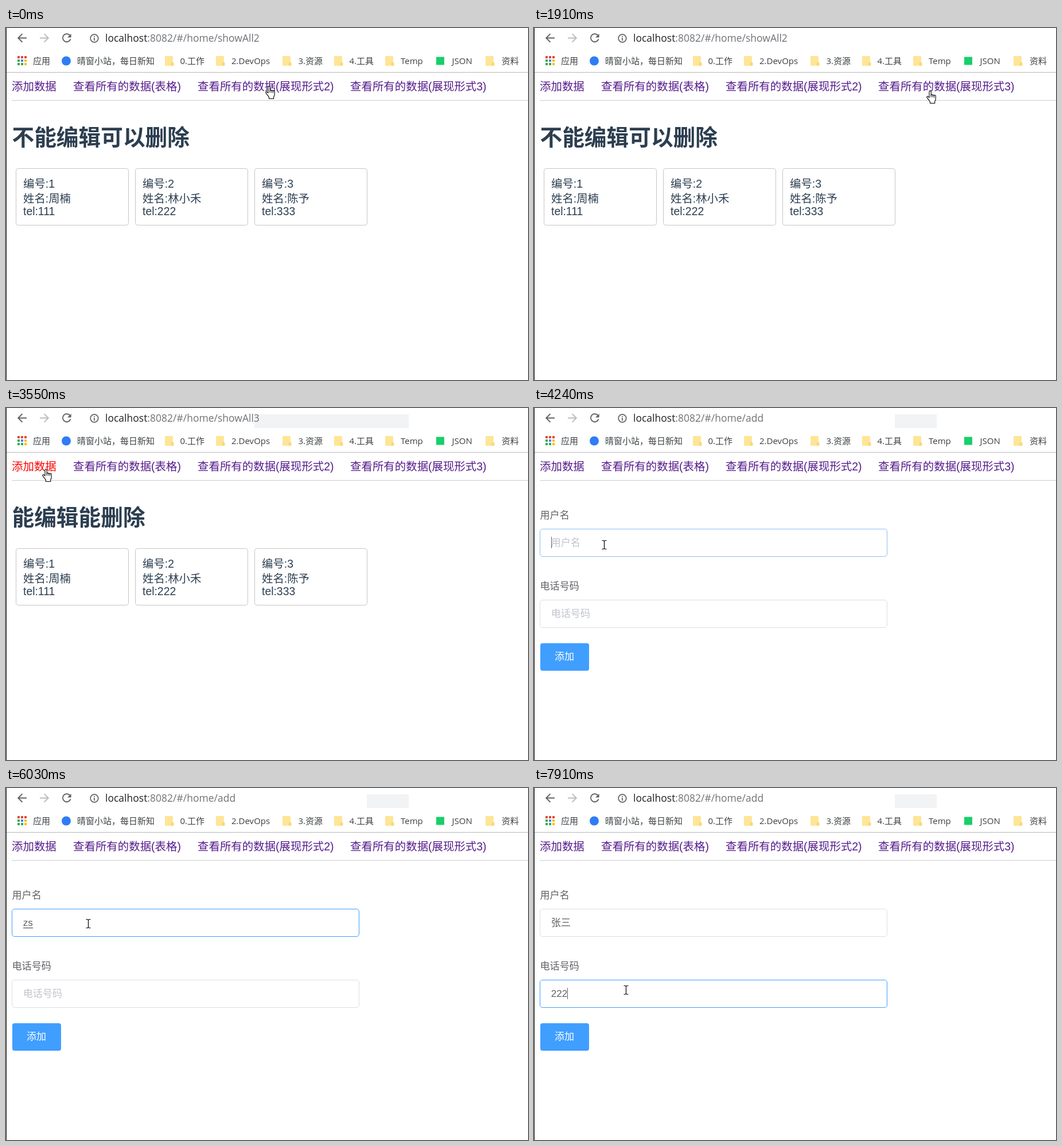
Animation, 910 px wide and 615 px high, one loop 8 s. Source, as an HTML page:

```html
<!DOCTYPE html>
<html lang="zh-CN">
<head>
<meta charset="utf-8">
<title>数据管理</title>
<style>
  html, body { margin: 0; width: 100%; height: 100%; overflow: hidden; background: #fff; }
  svg { display: block; width: 910px; height: 615px; }
  text { white-space: pre; }
  .bar { font-family: "Open Sans", "Noto Sans CJK SC", sans-serif; }
  .page { font-family: "Liberation Sans", "Noto Sans CJK SC", sans-serif; font-weight: 350; }
  .url { font-size: 17.5px; }
  .mark { font-size: 15px; fill: #3c4043; }
  .link { font-size: 19.45px; fill: #551a8b; }
  .head { font-size: 38.7px; font-weight: 700; fill: #2c3e50; }
  .card { font-size: 19.4px; fill: #2c3e50; }
  .form { font-size: 17.1px; fill: #606266; }
  .hint { fill: #c0c4cc; }
</style>
</head>
<body>
<svg id="stage" viewBox="0 0 910 615"></svg>
<script>
const LOOP = 8000;
const stage = document.getElementById('stage');

function add(parent, tag, attrs, content) {
  const el = document.createElementNS('http://www.w3.org/2000/svg', tag);
  for (const key in attrs) el.setAttribute(key, attrs[key]);
  if (content) el.textContent = content;
  parent.append(el);
  return el;
}
const text = (parent, cls, x, y, content) => add(parent, 'text', { class: cls, x, y }, content);
const rect = (parent, x, y, width, height, fill, more) =>
  add(parent, 'rect', { x, y, width, height, fill, ...more });
const path = (parent, d, stroke, width, fill = 'none') =>
  add(parent, 'path', { d, stroke, 'stroke-width': width, fill });
const show = (el, on) => { el.style.display = on ? '' : 'none'; };

// Browser toolbar
const bar = add(stage, 'g', { class: 'bar' });
const patch = rect(bar, 433, 11, 269, 24, '#f1f3f4');
path(bar, 'M36 17.5H21.5M28.5 10.2L21.2 17.5L28.5 24.8', '#5f6368', 1.9);
path(bar, 'M59 17.5H73.5M66.5 10.2L73.8 17.5L66.5 24.8', '#babcbe', 1.9);
path(bar, 'M111.2 12.6A7 7 0 1 0 112.6 19.3', '#5f6368', 1.9);
path(bar, 'M113.6 10V16.6H107Z', 'none', 0, '#5f6368');
add(bar, 'circle', { cx: 154, cy: 18, r: 6.8, fill: 'none', stroke: '#5f6368', 'stroke-width': 1.7 });
path(bar, 'M154 17V22M154 14V15.8', '#5f6368', 1.8);
const url = text(bar, 'url', 173, 24);
add(url, 'tspan', { fill: '#202124' }, 'localhost');
const route = add(url, 'tspan', { fill: '#6f7377' });

// Bookmarks
const R = '#ea4335', G = '#34a853', B = '#4285f4', Y = '#fbbc05';
[R, R, R, G, B, Y, G, G, Y].forEach((color, i) =>
  rect(bar, 20 + i % 3 * 6, 49 + Math.floor(i / 3) * 6, 4, 4, color));
add(bar, 'circle', { cx: 105, cy: 57.5, r: 8, fill: '#2f7cf6' });
rect(bar, 750, 50.5, 14, 14, '#19cf6b');
for (const x of [277, 366, 482, 572, 661, 836]) {
  rect(bar, x, 49, 14, 17, '#ffe596', { rx: 1.2 });
  rect(bar, x + 10.5, 60, 5, 6, '#f9d978', { rx: 1 });
}
[[47, '应用'], [124, '晴窗小站，每日新知'], [303.5, '0.工作'], [393, '2.DevOps'], [509.5, '3.资源'],
 [598.5, '4.工具'], [688, 'Temp'], [777.5, 'JSON'], [864, '资料']]
  .forEach(([x, label]) => text(bar, 'mark', x, 63, label));
rect(bar, 0, 77, 910, 1, '#b6b6b6');

// Page navigation
const page = add(stage, 'g', { class: 'page' });
rect(page, 0, 0, 1, 615, '#1c1c1c');
const links = [[10, 78, '添加数据'], [117, 189, '查看所有的数据(表格)'],
  [334, 238, '查看所有的数据(展现形式2)'], [600, 238, '查看所有的数据(展现形式3)']];
const [addLink] = links.map(([x, , label]) => text(page, 'link', x, 109, label));
rect(page, 10, 126, 900, 1, '#cccccc');

// Card list
const list = add(page, 'g');
const heading = text(list, 'head', 10.5, 204.5);
['周楠', '林小禾', '陈予'].forEach((name, i) => {
  const x = 17 + i * 208, n = i + 1;
  rect(list, x - .5, 245.5, 196, 99, '#fff', { rx: 4, stroke: '#c6c6c6', transform: 'translate(1 0)' });
  text(list, 'card', x + 13, 279, '编号:' + n);
  text(list, 'card', x + 13, 304.5, '姓名:' + name);
  text(list, 'card', x + 13, 326.5, 'tel:' + n * 111);
});

// Form
const form = add(page, 'g');
function makeField(y, label) {
  text(form, 'form', 10.5, y - 18.5, label);
  const box = rect(form, 10.5, y + .5, 605, 48, '#fff', { rx: 4.5 });
  const hint = text(form, 'form hint', 29.7, y + 30, label);
  const value = text(form, 'form', 29.7, y + 30);
  const line = rect(form, 30, y + 33, 17, 1, '#303133');
  const caret = rect(form, 30, y + 14, 1, 20, '#606266');
  return { box, hint, value, line, caret };
}
const nameField = makeField(211, '用户名');
const telField = makeField(335, '电话号码');
rect(form, 11, 411, 85, 48, '#409eff', { rx: 4 });
text(form, 'form', 36, 440.3, '添加').style.fill = '#fff';

// Cursors, each with its hot spot at 0,0
const cursor = add(stage, 'g');
const hand = add(cursor, 'g', { transform: 'translate(-7 -1)', 'stroke-linejoin': 'round' });
path(hand, 'M5 12.5V2.4a1.6 1.6 0 0 1 3.2 0V8.2a1.5 1.5 0 0 1 2.8 .4a1.5 1.5 0 0 1 2.6 .6' +
  'a1.4 1.4 0 0 1 2.6 1.1V15c0 2-1.5 3.2-1.5 5v2.5H6.5v-2.5C5.5 18 2.8 15 1 12.4' +
  'c-.9-1.5 1-2.7 2.2-1.5Z', '#000', 1.1, '#fff');
path(hand, 'M8.2 8V12M11 9V12.2M13.6 9.6V12.6', '#000', 1);
const beam = path(cursor, 'M-3.5 -7.5H-1L.5 -6.5L2 -7.5H4.5M.5 -7V7M-3.5 7.5H-1L.5 6.5L2 7.5H4.5', '#000', 1.2);
const arrow = path(cursor, 'M0 0V16.5L3.8 13L6.4 19L8.9 17.9L6.3 12H11.5Z', '#000', 1, '#fff');

// Time, x, y of the hot spot
const track = [
  [0, 459, 102], [125, 440, 112], [375, 255, 148], [500, 310, 140], [875, 812, 95],
  [1125, 672, 108], [1500, 684, 107], [1870, 691, 110], [2000, 691, 110], [2125, 686, 108],
  [2250, 684, 108], [2500, 590, 130], [2750, 380, 145], [3000, 170, 138], [3250, 70, 107],
  [3750, 70, 107], [3875, 85, 160], [4120, 122, 239], [4625, 122, 239], [5120, 123, 228],
  [5375, 123, 228], [5625, 148, 240], [5990, 143, 237], [6250, 143, 237], [6600, 165, 352],
  [7000, 165, 352], [7375, 160, 353], [LOOP, 160, 353]
];
const nameSteps = [[0, ''], [5610, 'z'], [5760, 'zs'], [6300, '张三']];
const telSteps = [[0, ''], [7500, '2'], [7660, '22'], [7910, '222']];
const routeSteps = [[0, 'showAll2'], [2050, 'showAll3'], [3670, 'add']];
const blinkSteps = [0, 4100, 6300, 6720, 7500, 7660, 7910].map(t => [t, t]);

const at = (steps, t) => steps.findLast(step => step[0] <= t)[1];
const ramp = (t, start, length) => Math.min(1, Math.max(0, (t - start) / length));

function position(t) {
  const i = track.findIndex(p => p[0] > t);
  const [t0, x0, y0] = track[i - 1], [t1, x1, y1] = track[i];
  const k = (t - t0) / (t1 - t0);
  return [x0 + (x1 - x0) * k, y0 + (y1 - y0) * k];
}

function drawField(field, value, focus, caretOn, composing) {
  const idle = [220, 223, 230], active = [64, 158, 255];
  const mixed = idle.map((c, i) => Math.round(c + (active[i] - c) * focus));
  field.box.setAttribute('stroke', `rgb(${mixed})`);
  field.value.textContent = value;
  show(field.hint, !value);
  show(field.line, composing);
  show(field.caret, caretOn && !composing);
  const width = value ? field.value.getComputedTextLength() : 0;
  field.line.setAttribute('width', width);
  field.caret.setAttribute('x', Math.round(29.7 + width));
}

function drawCursor(t, onForm) {
  const [x, y] = position(Math.floor(t / 125) * 125);
  const overLink = y > 90 && y < 114 && links.some(([left, w]) => x >= left && x <= left + w);
  const overField = onForm && x > 10 && x < 616 && (y > 211 && y < 260 || y > 335 && y < 384);
  cursor.setAttribute('transform', `translate(${Math.round(x)} ${Math.round(y)})`);
  show(hand, overLink);
  show(beam, overField);
  show(arrow, !overLink && !overField);
}

function draw(t) {
  const onForm = t >= 3670;
  route.textContent = ':8082/#/home/' + at(routeSteps, t);
  show(patch, t >= 2050);
  patch.setAttribute('x', onForm ? 629 : 433);
  patch.setAttribute('width', onForm ? 73 : 269);
  addLink.style.fill = t >= 3400 && !onForm ? '#f00' : '';
  heading.textContent = t < 2170 ? '不能编辑可以删除' : '能编辑能删除';
  show(list, !onForm);
  show(form, onForm);
  if (onForm) {
    const blink = Math.floor((t - at(blinkSteps, t)) / 530) % 2 === 0;
    const typed = at(nameSteps, t);
    const onName = t >= 4100 && t < 6720;
    drawField(nameField, typed, ramp(t, 4120, 240) - ramp(t, 6760, 200), onName && blink, typed[0] === 'z');
    drawField(telField, at(telSteps, t), ramp(t, 6640, 200), t >= 6720 && blink, false);
  }
  drawCursor(t, onForm);
}

function tick() {
  draw(performance.now() % LOOP);
  requestAnimationFrame(tick);
}
tick();
</script>
</body>
</html>
```
